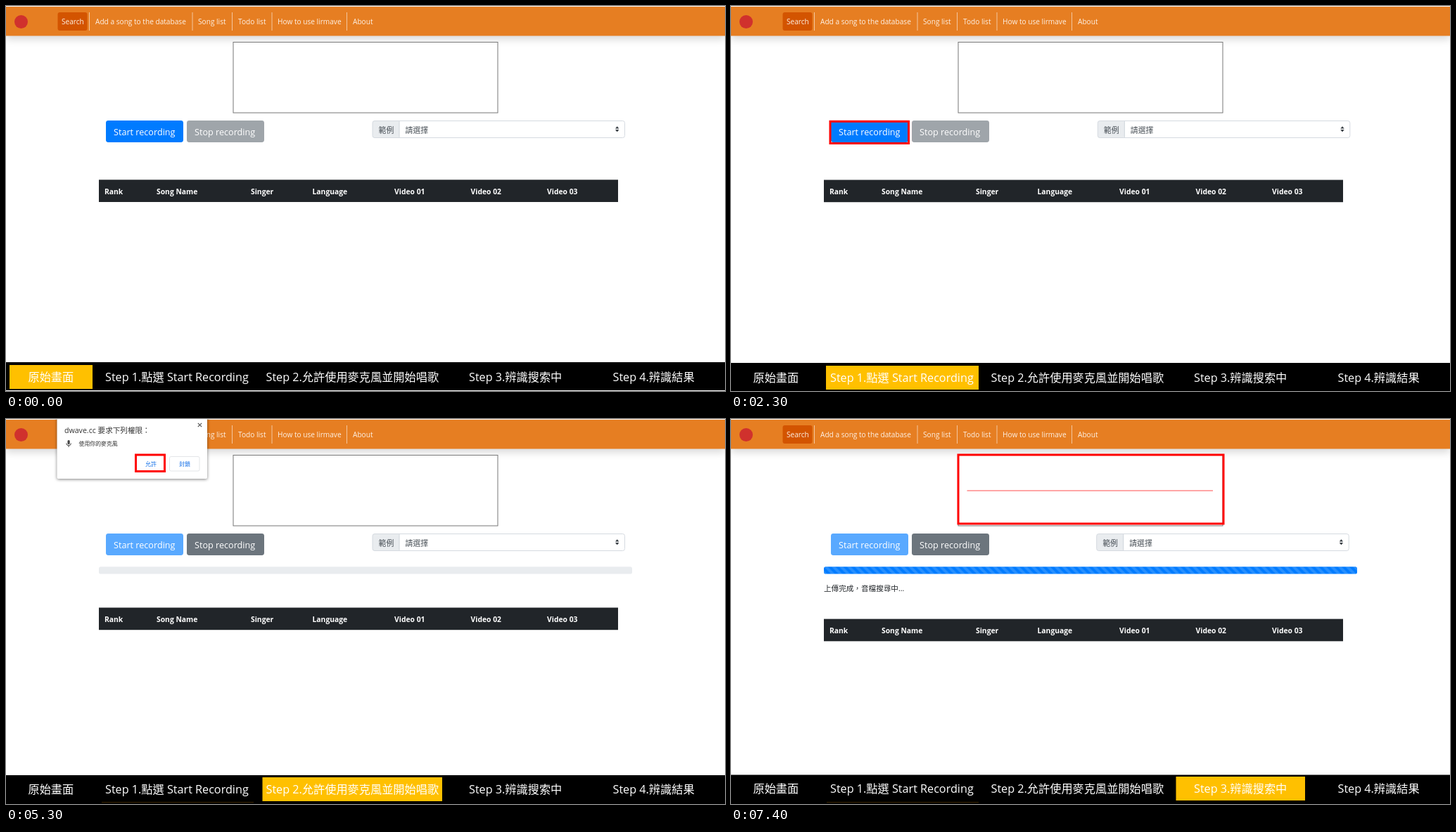
Animation of 1022x548 px, one loop 8 s. Source, as an HTML page:

```html
<!DOCTYPE html>
<html lang="zh-Hant">
<head>
<meta charset="utf-8">
<title>Humming search walkthrough</title>
<style>
html, body { margin: 0; width: 100%; height: 100%; overflow: hidden; background: #fff; }
svg { display: block; width: 1022px; height: 548px; font-family: "Open Sans", "Noto Sans CJK TC", "Noto Sans CJK JP", sans-serif; }
text { white-space: pre; }
.header { filter: drop-shadow(0 5.4px 5.4px rgba(0, 0, 0, .15)); }
.popup { filter: drop-shadow(0 1px 2px rgba(0, 0, 0, .5)); }
</style>
</head>
<body>
<svg id="stage" viewBox="0 0 1022 548">
  <defs>
    <pattern id="stripes" width="10.9" height="10.9" y="210.3" x="132" patternUnits="userSpaceOnUse">
      <path d="M0 0h.5L1 .5V1zM0 .5V1H.5z" transform="scale(10.9)" fill="#fff" fill-opacity=".15"/>
    </pattern>
  </defs>
  <g id="view"></g>
</svg>
<script>
const LOOP = 8000;
const SCENES = [
  { start: 0, tableY: 247.3, barY: 507, barEnd: 547, stepY: 528, selectX: 0 },
  { start: 500, tableY: 247.5, barY: 508, barEnd: 548, stepY: 529, selectX: .3 },
  { start: 3500, tableY: 268.5, barY: 507, barEnd: 548, stepY: 527, selectX: 0 },
  { start: 6500, tableY: 284.6, barY: 506.5, barEnd: 548, stepY: 526, selectX: -1.3 },
];
const NAV = [[79, 'Search'], [127, 'Add a song to the database'], [273, 'Song list'],
  [330, 'Todo list'], [386, 'How to use lirmave'], [493, 'About']];
const COLUMNS = [[140, 'Rank'], [214, 'Song Name'], [348, 'Singer'], [435.5, 'Language'],
  [552, 'Video 01'], [660.5, 'Video 02'], [769, 'Video 03']];
// text x, label, highlight left, highlight width
const STEPS = [
  [31.5, '原始畫面', 5, 118],
  [141, 'Step 1.點選 Start Recording', 135, 217],
  [369.5, 'Step 2.允許使用麥克風並開始唱歌', 364.5, 255.5],
  [658, 'Step 3.辨識搜索中', 632.5, 183.5],
  [862.5, 'Step 4.辨識結果', 850, 140],
];

const rect = (x, y, w, h, fill, extra = '') =>
  `<rect x="${x}" y="${y}" width="${w}" height="${h}" fill="${fill}" ${extra}/>`;
const text = (x, y, size, fill, label, extra = '') =>
  `<text x="${x}" y="${y}" font-size="${size}" fill="${fill}" ${extra}>${label}</text>`;
const path = (d, stroke, width = 1, extra = 'fill="none"') =>
  `<path d="${d}" stroke="${stroke}" stroke-width="${width}" ${extra}/>`;
const redFrame = (x, y, w, h) => rect(x, y, w, h, 'none', 'stroke="#f00" stroke-width="3"');

const header = () =>
  rect(0, 1, 1022, 41.5, '#e67e22', 'class="header"') +
  '<circle cx="21.5" cy="22.5" r="9.5" fill="#d0312d"/>' +
  rect(73.5, 9, 42, 26, '#d35400', 'rx="3"') +
  [118.5, 265, 321.5, 378, 484.5].map(x => path(`M${x} 9V35`, '#f3c69f')).join('') +
  NAV.map(([x, label]) => text(x, 26, 10.15, '#fdf1e6', label)).join('');

const button = (x, fill, label, enabled) =>
  rect(x, 163, 110, 31, fill, `rx="3.4" opacity="${enabled ? 1 : .65}"`) +
  text(x + 11, 184, 12.65, '#fff', label);

const select = dx => `<g transform="translate(${dx})">` +
  rect(521, 163.5, 358.5, 24, '#fff', 'rx="3"') +
  rect(521, 163.5, 38, 24, '#e9ecef', 'rx="3"') +
  path('M559 163.5V187.5', '#ced4da') +
  rect(521, 163.5, 358.5, 24, 'none', 'rx="3" stroke="#d5dae0"') +
  text(529.5, 180.5, 10.9, '#495057', '範例') +
  text(567.5, 180.5, 10.9, '#495057', '請選擇') +
  '<path d="M866 174.5l2.7-3.2 2.7 3.2zM866 176l2.7 3.2 2.7-3.2z" fill="#343a40"/></g>';

const table = y => rect(132, y, 738, 31.7, '#212529') +
  COLUMNS.map(([x, label]) => text(x, y + 20.2, 10.35, '#fff', label, 'font-weight="700"')).join('');

const steps = ({ barY, barEnd, stepY }, active) => {
  const [, , left, width] = STEPS[active];
  return rect(0, barY, 1022, barEnd - barY, '#000') +
    (active > 1 ? path('M136 545.5H352', '#3a2400') : '') +
    rect(left, stepY - 17, width, 34, '#ffc000') +
    STEPS.map(([x, label]) => text(x, stepY + 6, 16.2, '#fff', label)).join('');
};

const popup = () =>
  rect(72.5, -4, 213.5, 89, '#fff', 'rx="2" class="popup"') +
  text(83, 20.3, 10.6, '#333', 'dwave.cc 要求下列權限：') +
  path('M272.8 5.8l5.4 5.4m0-5.4l-5.4 5.4', '#555', 1.2) +
  rect(87.5, 30, 3.2, 6.2, '#444', 'rx="1.6"') +
  path('M85.8 34.5a3.3 3.3 0 0 0 6.6 0M89.1 37.8V40', '#444') +
  text(103.5, 38.4, 7.9, '#333', '使用你的麥克風') +
  text(198, 66.8, 8, '#1a73e8', '允許') +
  rect(232.5, 53.5, 42.5, 20.5, 'none', 'rx="2" stroke="#e3e5e8"') +
  text(246, 66.8, 8, '#1a73e8', '封鎖') +
  redFrame(184.5, 51, 41, 23.5);

const progress = done =>
  rect(132, 210.3, 758, 10.3, done ? '#007bff' : '#e9ecef', 'rx="2.7"') +
  (done ? rect(132, 210.3, 758, 10.3, 'url(#stripes)', 'rx="2.7"') +
    text(132, 244.5, 10.6, '#212529', '上傳完成，音檔搜尋中...') : '');

const searching = () =>
  path('M335.5 102H685', '#ff4d4d') + redFrame(323, 51, 377, 98);

function draw(index) {
  const scene = SCENES[index], recording = index > 1;
  document.getElementById('view').innerHTML =
    header() +
    rect(323, 51.5, 376, 100.5, '#fff', 'stroke="#777"') +
    button(142, '#007bff', 'Start recording', !recording) +
    button(257, '#6c757d', 'Stop recording', recording) +
    select(scene.selectX) +
    table(scene.tableY) +
    steps(scene, index) +
    (recording ? progress(index === 3) : '') +
    [() => '', () => redFrame(141, 164.3, 111.5, 31.2), popup, searching][index]();
}

const began = performance.now();
let shown = -1;
function tick() {
  const time = (performance.now() - began) % LOOP;
  const index = SCENES.findLastIndex(scene => scene.start <= time);
  if (index !== shown) draw(shown = index);
  requestAnimationFrame(tick);
}
tick();
</script>
</body>
</html>
```
